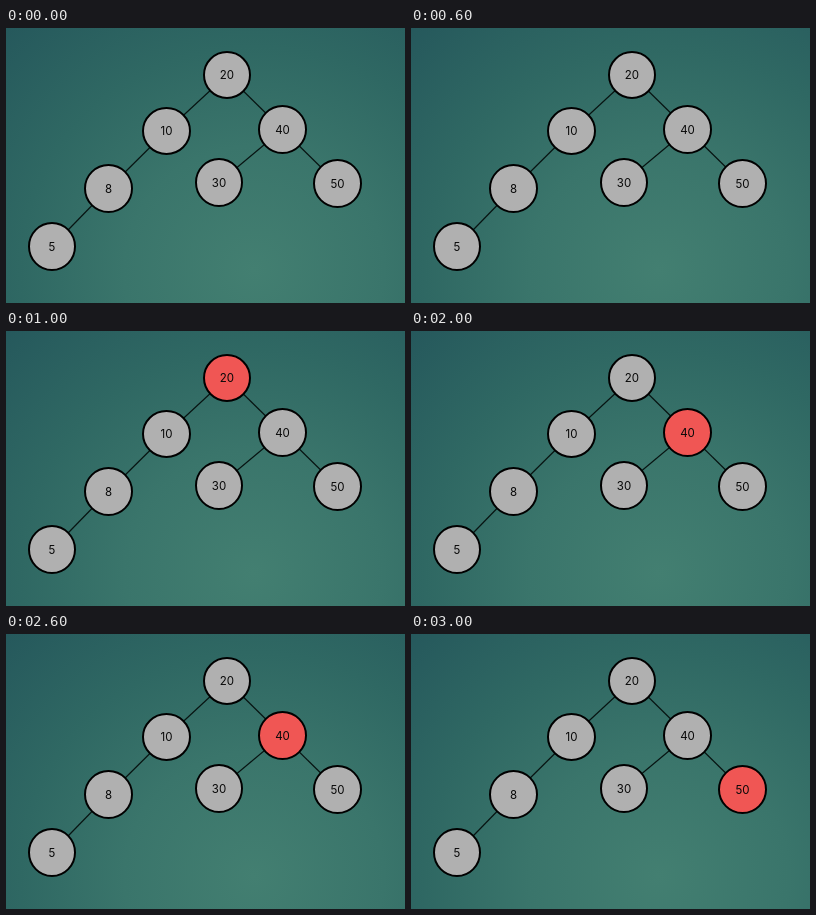
Recreate the animation shown at these times as an HTML page. Size 399 px wide and 275 px high, loop 4 s.

```html
<!DOCTYPE html>
<html lang="en">
<head>
<meta charset="utf-8">
<title>Binary search tree lookup</title>
<style>
  html, body { margin: 0; width: 100%; height: 100%; overflow: hidden; }
  body { background: radial-gradient(ellipse 325px 310px at 248px 242px, #437f71, #3a756b 40%, #2f6863 72%, #24565b 115%); }
  svg { display: block; width: 399px; height: 275px; }
  line { stroke: #071412; stroke-width: 1.2; }
  ellipse { fill: #b0b0b0; stroke: #000; stroke-width: 2; }
  .active { fill: #f05654; }
  text { font: 11.5px Inter, sans-serif; text-anchor: middle; fill: #080808; }
</style>
</head>
<body>
<svg viewBox="0 0 399 275"></svg>
<script>
  const tree = {
    value: 20, x: 221, y: 47,
    left: {
      value: 10, x: 160.5, y: 103,
      left: { value: 8, x: 102.5, y: 160.5, left: { value: 5, x: 46, y: 218.5 } }
    },
    right: {
      value: 40, x: 276.5, y: 101.5,
      left: { value: 30, x: 213, y: 154.5 },
      right: { value: 50, x: 331.5, y: 155.5 }
    }
  };
  const wanted = 50, stepMs = 1000;
  const svg = document.querySelector("svg");

  function add(tag, attrs) {
    const el = document.createElementNS("http://www.w3.org/2000/svg", tag);
    for (const key in attrs) el.setAttribute(key, attrs[key]);
    return svg.appendChild(el);
  }

  // Edges and subtrees go first, so that each node covers its line ends.
  function addNode(node) {
    const { x, y, value } = node;
    for (const child of [node.left, node.right]) {
      if (!child) continue;
      add("line", { x1: x, y1: y, x2: child.x, y2: child.y });
      addNode(child);
    }
    // Radii grow by the half pixel that keeps the outline on whole pixels.
    node.shape = add("ellipse", { cx: x, cy: y, rx: 23 + x % 1, ry: 23 + y % 1 });
    add("text", { x, y: y + 4.2 }).textContent = value;
  }
  addNode(tree);

  const visited = [];
  for (let node = tree; node; node = wanted < node.value ? node.left : node.right) visited.push(node);

  const start = performance.now();
  function draw(now) {
    const step = Math.floor(Math.max(0, now - start) / stepMs) % (visited.length + 1);
    visited.forEach((node, i) => node.shape.classList.toggle("active", i === step - 1));
    requestAnimationFrame(draw);
  }
  draw(start);
</script>
</body>
</html>
```
